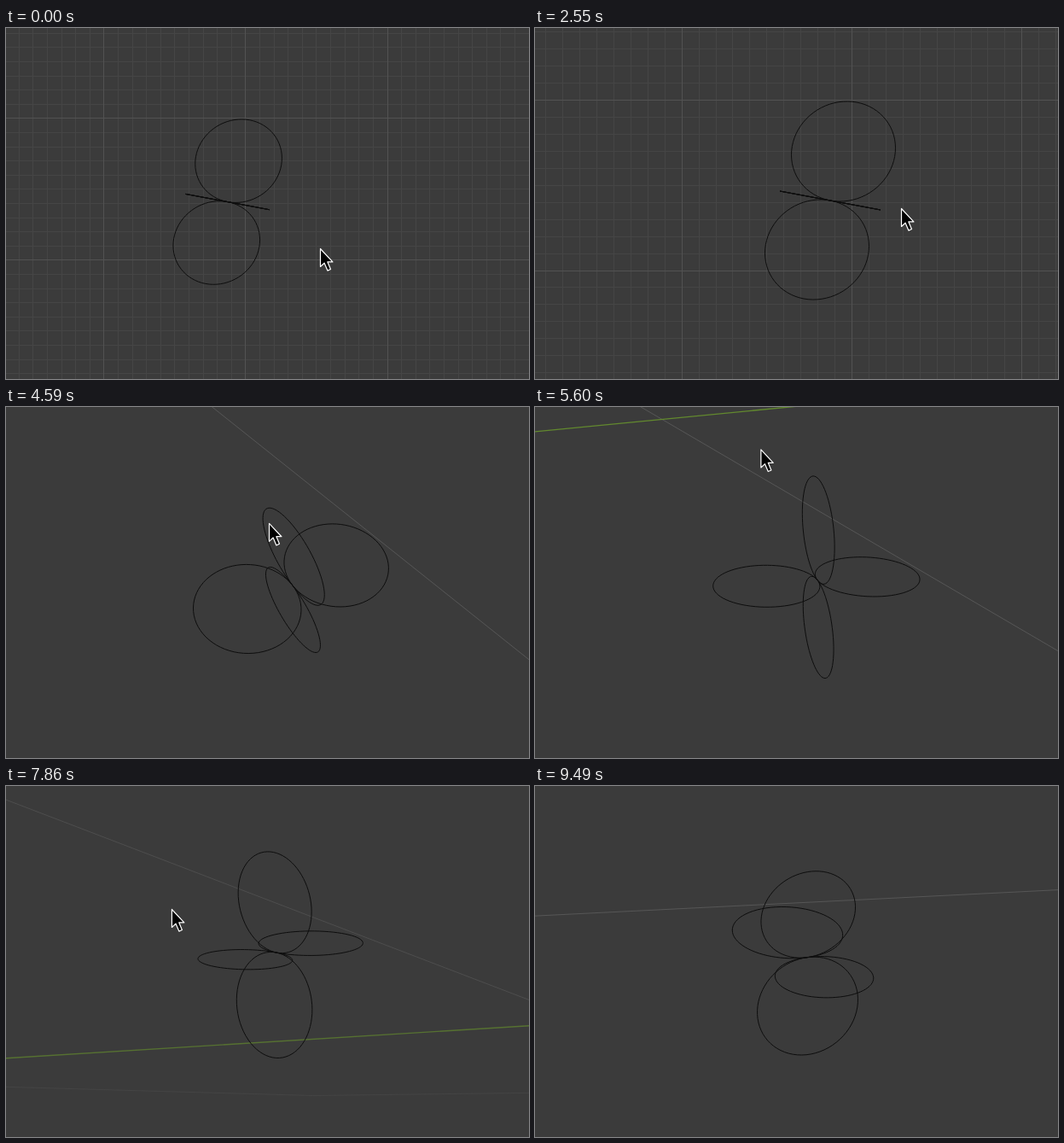
Write an HTML page that moves like this. It is 613 by 411 pixels and loops after 9760 ms.

```html
<!DOCTYPE html>
<html lang="en">
<head>
<meta charset="utf-8">
<title>Viewport orbit</title>
<style>
html, body { margin: 0; width: 100%; height: 100%; overflow: hidden; background: #3b3b3b; }
svg { display: block; width: 613px; height: 411px; }
path { fill: none; }
</style>
</head>
<body>
<svg viewBox="0 0 613 411">
  <path id="minor" stroke="#454545"/>
  <path id="major" stroke="#525252"/>
  <path id="edges" stroke="#444"/>
  <path id="axisX" stroke="#565656"/>
  <path id="axisY" stroke="#62892e" stroke-width="1.4"/>
  <path id="curves" stroke="#0d0d0d"/>
  <path id="cursor" d="M0 0V21L4.6 16.7 8.4 25.6 12 24 8.4 15.4H14.4Z"
    style="fill:#000" stroke="#fff" stroke-width="1.2" stroke-linejoin="round"/>
</svg>
<script>
const LOOP = 9760, W = 613, H = 411;
const PIVOT = { x: 332, y: 193.5 }, DIST = 880, ZOOM = 1.2;
const YAW_RATE = 0.376, PITCH_RATE = 0.416; // degrees per dragged pixel

// Mouse actions: first step, last step, steps, end x, end y, mode
const actions = [
  [370, 470, 2, 349, 212, 'move'],
  [750, 923, 3, 357, 229, 'move'],
  [1010, 1270, 4, 345, 214, 'move'],
  [1650, 1990, 5, 429, 211, 'pan'],
  [2550, 2550, 1, 429, 211, 'zoom'],
  [2930, 3680, 9, 372, 178, 'orbit'],
  [3950, 4850, 11, 284, 120, 'orbit'],
  [4930, 5880, 11, 257, 23, 'orbit'],
  [5970, 5970, 1, 254, 25, 'orbit'],
  [6250, 6330, 2, 350, 193, 'move'],
  [6520, 6520, 1, 350, 203, 'move'],
  [6700, 7056, 5, 324, 184, 'orbit'],
  [7145, 7590, 6, 225, 150, 'orbit'],
  [7690, 8620, 11, 111, 128, 'orbit'],
  [8710, 9490, 10, 32, 105, 'orbit']
];
const HIDE = 9490;

// World space around the pivot, z up
const centre = [14, -8.5, -3];
const up = [0, 0, 60.7], side = [15.5, 57.5, 0], shared = [59, -11, 0];
const floor = { x: -957, y: 108.8, gap: 199.3, rx: 6700, ry: 5000 };

const rad = deg => deg * Math.PI / 180;
const set = (id, name, value) => document.getElementById(id).setAttribute(name, value);

// Replay every mouse action up to time t
function stateAt(t) {
  const s = { x: 368, y: 258, panX: -84, panY: 3, scale: 1 / ZOOM, yaw: 0, pitch: 90, ortho: true };
  for (const [start, end, steps, x, y, mode] of actions) {
    if (t < start) break;
    const gap = (end - start) / (steps - 1) || 1;
    const done = Math.min(steps, 1 + Math.floor((t - start + 18) / gap)) / steps;
    const dx = (x - s.x) * done, dy = (y - s.y) * done;
    s.x += dx;
    s.y += dy;
    if (mode === 'pan') {
      s.panX += dx;
      s.panY += dy;
    } else if (mode === 'zoom') {
      s.scale = 1;
    } else if (mode === 'orbit') {
      s.yaw -= dx * YAW_RATE;
      s.pitch += dy * PITCH_RATE;
      s.ortho = false;
    }
  }
  return s;
}

// World point to [right, down, perspective divisor]
function camera({ yaw, pitch, scale, ortho }) {
  const ca = Math.cos(rad(yaw)), sa = Math.sin(rad(yaw));
  const ce = Math.cos(rad(pitch)), se = Math.sin(rad(pitch));
  return ([x, y, z]) => {
    const ahead = y * ca - x * sa;
    return [
      scale * (x * ca + y * sa),
      -scale * (ahead * se + z * ce),
      ortho ? 1 : 1 + (ahead * ce - z * se) / DIST
    ];
  };
}

function render(t) {
  const s = stateAt(t), cam = camera(s);
  const cx = PIVOT.x + s.panX, cy = PIVOT.y + s.panY;
  const place = ([x, y, w]) => (cx + x / w).toFixed(2) + ' ' + (cy + y / w).toFixed(2);

  function circle(axis, sign) {
    const pts = Array.from({ length: 72 }, (_, i) => {
      const a = rad(i * 5), c = sign + Math.cos(a), d = Math.sin(a);
      return place(cam(centre.map((o, j) => o + axis[j] * c + shared[j] * d)));
    });
    return 'M' + pts.join('L') + 'Z';
  }

  // Floor line, clipped in front of the camera
  function line(x1, y1, x2, y2) {
    const near = 0.05, p = cam([x1, y1, 0]), q = cam([x2, y2, 0]);
    if (p[2] < near && q[2] < near) return '';
    const clip = (m, n) => {
      const u = m[2] < near ? (near - m[2]) / (n[2] - m[2]) : 0;
      return place(m.map((v, i) => v + (n[i] - v) * u));
    };
    return 'M' + clip(p, q) + 'L' + clip(q, p);
  }

  function grid(gap) {
    const first = o => ((o % gap) + gap) % gap;
    let d = '';
    for (let x = first(cx + floor.x * s.scale); x < W; x += gap) d += `M${Math.floor(x) + 0.5} 0V${H}`;
    for (let y = first(cy - floor.y * s.scale); y < H; y += gap) d += `M0 ${Math.floor(y) + 0.5}H${W}`;
    return d;
  }

  const gap = floor.gap * s.scale;
  set('minor', 'd', s.ortho ? grid(gap / 10) : '');
  set('major', 'd', s.ortho ? grid(gap) : '');

  const { x, y, rx, ry } = floor;
  const l = x - rx, r = x + rx, b = y - ry, f = y + ry;
  const fade = Math.min(1, 0.2 + 2.4 * Math.abs(Math.sin(rad(s.pitch))));
  set('axisX', 'd', s.ortho ? '' : line(l, y, r, y));
  set('axisY', 'd', s.ortho ? '' : line(x, b, x, f));
  set('edges', 'd', s.ortho ? '' : line(l, b, r, b) + line(l, f, r, f) + line(l, b, l, f) + line(r, b, r, f));
  set('axisX', 'opacity', fade);
  set('axisY', 'opacity', fade);

  set('curves', 'd', [up, side].map(a => circle(a, 1) + circle(a, -1)).join(''));
  set('cursor', 'transform', `translate(${s.x + 0.5} ${s.y + 0.5})`);
  set('cursor', 'visibility', t < HIDE ? 'visible' : 'hidden');
}

const start = performance.now();
function tick() {
  render((performance.now() - start) % LOOP);
  requestAnimationFrame(tick);
}
tick();
</script>
</body>
</html>
```
